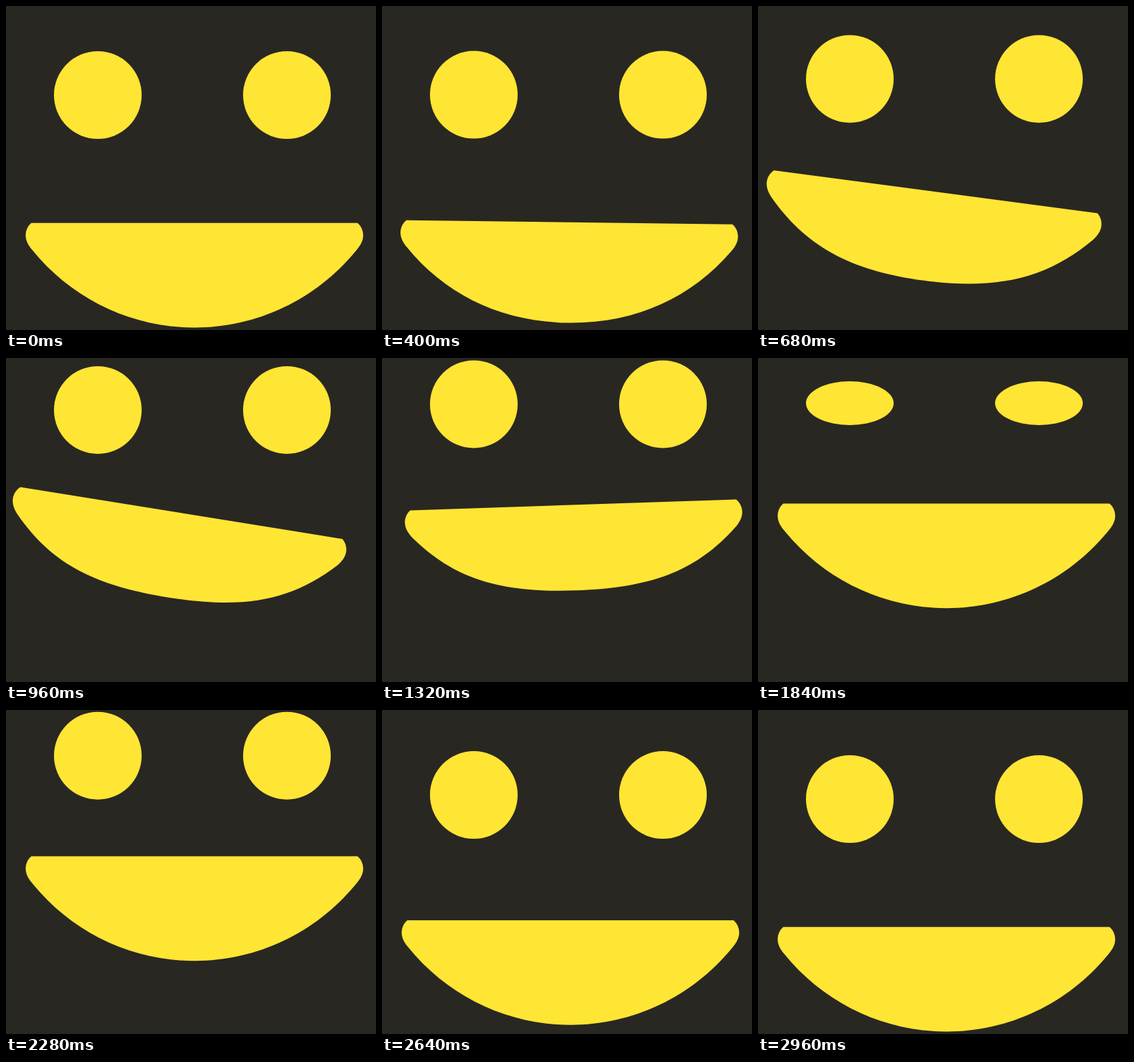
An HTML page that plays this animation: 540 px wide and 473 px high, repeating every 3160 ms.

```html
<!DOCTYPE html>
<html lang="en">
<head>
<meta charset="utf-8">
<title>Smile</title>
<style>
  html, body { margin: 0; width: 100%; height: 100%; overflow: hidden; background: #292722; }
  svg { display: block; width: 100%; height: 100%; fill: #ffe534; }
</style>
</head>
<body>
<svg viewBox="0 0 540 473">
  <ellipse class="eye" cx="134" rx="64"/>
  <ellipse class="eye" cx="410" rx="64"/>
  <path id="mouth"/>
</svg>
<script>
const LOOP = 3160, STEP = 40;
const eyes = document.querySelectorAll('.eye');
const mouth = document.getElementById('mouth');

const cubic = (a, b, s) => 3 * a * s * (1 - s) ** 2 + 3 * b * s * s * (1 - s) + s ** 3;

function bezier(x1, y1, x2, y2) {
  return u => {
    let lo = 0, hi = 1;
    for (let i = 0; i < 24; i++) {
      const mid = (lo + hi) / 2;
      if (cubic(x1, x2, mid) < u) lo = mid; else hi = mid;
    }
    return cubic(y1, y2, (lo + hi) / 2);
  };
}

const smooth = u => (1 - Math.cos(Math.PI * u)) / 2;
const windUp = bezier(.8, 0, .64, 1);
const settle = bezier(.07, .55, .45, 1);
const drop = bezier(.4, 0, 0, 1);
const open = bezier(.33, 0, .2, 1);

const ramp = (t, from, to, ease = smooth) =>
  ease(Math.min(1, Math.max(0, (t - from) / (to - from))));

// 0 at the bottom, 1 at the top
function lift(t, lead = 0) {
  if (t >= 2235) return 1 - ramp(t, 2235, 2945, drop);
  const at = t + lead;
  return at < 720
    ? .54 * ramp(at, 180, 720, u => u ** 5)
    : .54 + .46 * ramp(at, 720, 1580, settle);
}

const tilt = t =>
  12 * ramp(t, 200, 870, windUp) - 17 * ramp(t, 870, 1205) + 5 * ramp(t, 1205, 1405);

const flatten = t => ramp(t, 180, 900) - ramp(t, 1300, 1700);

const openness = t => 1 - .8 * (ramp(t, 1580, 1780) - ramp(t, 1780, 2000, open));

function mouthPath(flat) {
  const depth = 152.7 - 28 * flat;
  const side = 111 - 11 * flat;
  const reach = 92 + 23 * flat;
  return `M-238 0C-244 5 -246.3 12 -246.3 18C-246.3 25 -243 32 -237 39
    C-179 ${side} ${-reach} ${depth} 0 ${depth}
    C${reach} ${depth} 179 ${side} 237 39
    C243 32 246.3 25 246.3 18C246.3 12 244 5 238 0Z`;
}

function draw(t) {
  for (const eye of eyes) {
    eye.setAttribute('cy', 130 - 64 * lift(t));
    eye.setAttribute('ry', 64 * openness(t));
  }
  const y = 316.7 - 104.2 * lift(t, 15);
  mouth.setAttribute('d', mouthPath(flatten(t)));
  mouth.setAttribute('transform', `translate(275 ${y}) rotate(${tilt(t)} 0 -119)`);
}

const start = performance.now();
function tick() {
  const t = (performance.now() - start) % LOOP;
  draw(Math.floor(t / STEP) * STEP);
  requestAnimationFrame(tick);
}
tick();
</script>
</body>
</html>
```
